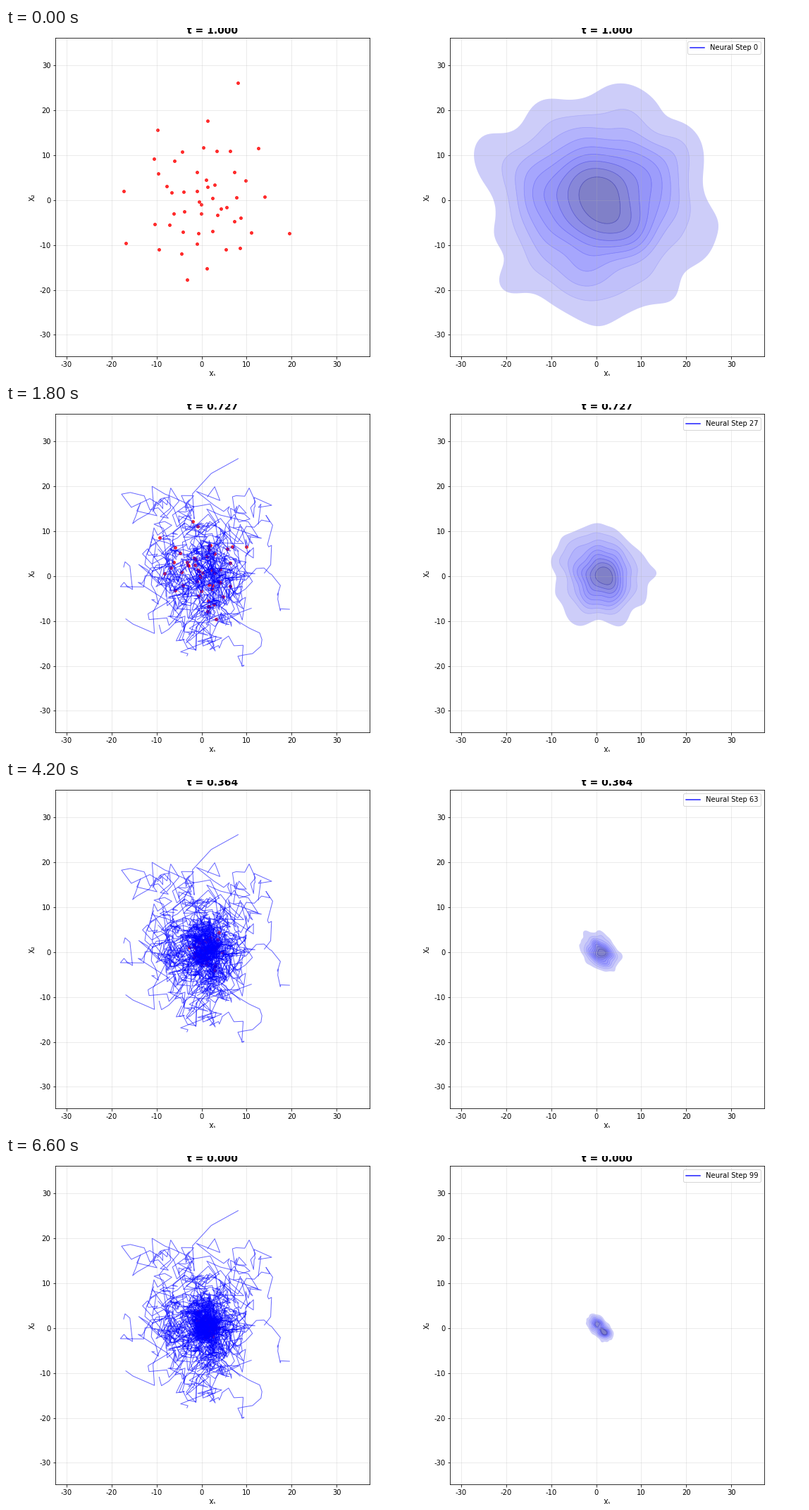
These frames come from a looping animation (1131 px wide and 495 px high, 6.8 s). A matplotlib script:

```python
import numpy as np
import matplotlib.pyplot as plt
from matplotlib.animation import FuncAnimation
from matplotlib.colors import LinearSegmentedColormap

W, H, DPI = 1131, 495, 72
FRAMES, INTERVAL, STRIDE = 34, 200, 3
STEPS = 99
SIGMA = 25.0
PRIOR = np.sqrt((SIGMA ** 2 - 1) / (2 * np.log(SIGMA)))
MODES = np.array([[0.0, 1.1], [1.8, -0.9]])
MODE_VAR = 0.7
TRAILS, CLOUD = 50, 500

plt.rcParams.update({
    "font.family": "DejaVu Sans",
    "font.size": 10,
    "axes.unicode_minus": False,
})

# Nine bands from pale outside to grey-blue inside
RAMP = LinearSegmentedColormap.from_list("ramp", [
    (0.0, "#cdcdf9"), (0.4, "#a4a4fd"), (0.65, "#9494f7"), (1.0, "#8080c8"),
])
BANDS = RAMP(np.linspace(0, 1, 9))[:, :3]
EDGES = (BANDS[:-1] + 2 * BANDS[1:] - 1) / 2
SHARES = np.linspace(0.05, 1, 10)[:-1]


def spread_start(rng):
    """Gaussian radii at golden-angle turns, the farthest one up and right."""
    rank = np.arange(TRAILS)
    radius = 8.8 * np.sqrt(-2 * np.log((rank + 0.5) / TRAILS))
    angle = np.radians(69 + 137.508 * rank)
    ring = np.column_stack([0.85 * np.cos(angle), np.sin(angle)])
    return radius[:, None] * ring + rng.normal(0, 1.2, ring.shape)


def simulate(start, rng):
    """Reverse diffusion from wide noise to two modes."""
    path = np.empty((STEPS + 1, len(start), 2))
    path[0] = start
    dt = 1 / STEPS
    for k in range(STEPS):
        g = SIGMA ** (1 - k * dt)
        var = MODE_VAR + (g * g - 1) / (2 * np.log(SIGMA))
        diff = MODES - path[k][:, None]
        sq = (diff ** 2).sum(axis=2)
        weight = np.exp(-(sq - sq.min(axis=1, keepdims=True)) / (2 * var))
        weight /= weight.sum(axis=1, keepdims=True)
        score = (weight[..., None] * diff).sum(axis=1) / var
        noise = rng.standard_normal(start.shape)
        path[k + 1] = path[k] + g * g * dt * score + g * np.sqrt(dt) * noise
    return path


def kernel_density(points, n=160, reach=4.6):
    """Gaussian density estimate on a grid along the whitened axes."""
    mean = points.mean(axis=0)
    root = np.linalg.cholesky(np.cov(points.T))
    white = np.linalg.solve(root, (points - mean).T)
    width = len(points) ** (-1 / 6)
    axis = np.linspace(-reach, reach, n)
    kx, ky = np.exp(-0.5 * ((axis - white[..., None]) / width) ** 2)
    grid = np.stack(np.meshgrid(axis, axis))
    x, y = np.einsum("ij,jab->iab", root, grid) + mean[:, None, None]
    return x, y, ky.T @ kx


def mass_levels(dens):
    """Density values below which the given shares of mass lie."""
    values = np.sort(dens.ravel())
    mass = np.cumsum(values) / values.sum()
    return np.append(np.interp(SHARES, mass, values), values[-1] * 1.01)


def make_axes(fig, left):
    width, top, bottom = 445.9, 14.2, 467.2
    ax = fig.add_axes([left / W, 1 - bottom / H, width / W, (bottom - top) / H])
    ax.set_xlim(-32.47, 37.39)
    ax.set_ylim(-34.83, 36.14)
    ticks = range(-30, 31, 10)
    ax.set_xticks(ticks)
    ax.set_yticks(ticks)
    ax.set_xlabel("X₁")
    ax.set_ylabel("X₂")
    ax.grid(True, alpha=0.3)
    title = ax.set_title("", fontsize=14, fontweight="bold", y=1.0)
    return ax, title


fig = plt.figure(figsize=(W / DPI, H / DPI), dpi=DPI, facecolor="white")
ax_path, title_path = make_axes(fig, 70.3)
ax_dens, title_dens = make_axes(fig, 630.3)

rng = np.random.default_rng(12)
PATHS = simulate(spread_start(rng), rng)
SAMPLES = simulate(rng.normal(0, PRIOR, (CLOUD, 2)), rng)

dots = ax_path.scatter(*PATHS[0].T, s=15, color="red", alpha=0.8, zorder=1)
trails = [ax_path.plot([], [], color="blue", lw=1, alpha=0.6)[0]
          for _ in range(TRAILS)]

ax_dens.plot([], [], color="blue", alpha=0.9, lw=1.5, label="Neural Step 0")
label = ax_dens.legend(loc="upper right").get_texts()[0]
shapes = []


def draw_density(points):
    while shapes:
        shapes.pop().remove()
    x, y, dens = kernel_density(points)
    levels = mass_levels(dens)
    shapes.append(ax_dens.contourf(x, y, dens, levels, colors=BANDS,
                                   antialiased=True, zorder=1))
    shapes.append(ax_dens.contour(x, y, dens, levels[1:-1], colors=EDGES,
                                  linewidths=0.7, zorder=1.1))


def update(frame):
    step = frame * STRIDE
    for title in (title_path, title_dens):
        title.set_text(f"t = {1 - step / STEPS:.3f}")
    label.set_text(f"Neural Step {step}")

    dots.set_offsets(PATHS[step])
    for i, line in enumerate(trails):
        line.set_data(*PATHS[:step + 1, i].T)

    draw_density(SAMPLES[step])
    return [dots, label, title_path, title_dens, *trails, *shapes]


anim = FuncAnimation(fig, update, frames=FRAMES, interval=INTERVAL,
                     init_func=lambda: update(0), repeat=True,
                     repeat_delay=0, blit=False)
plt.show()
```
